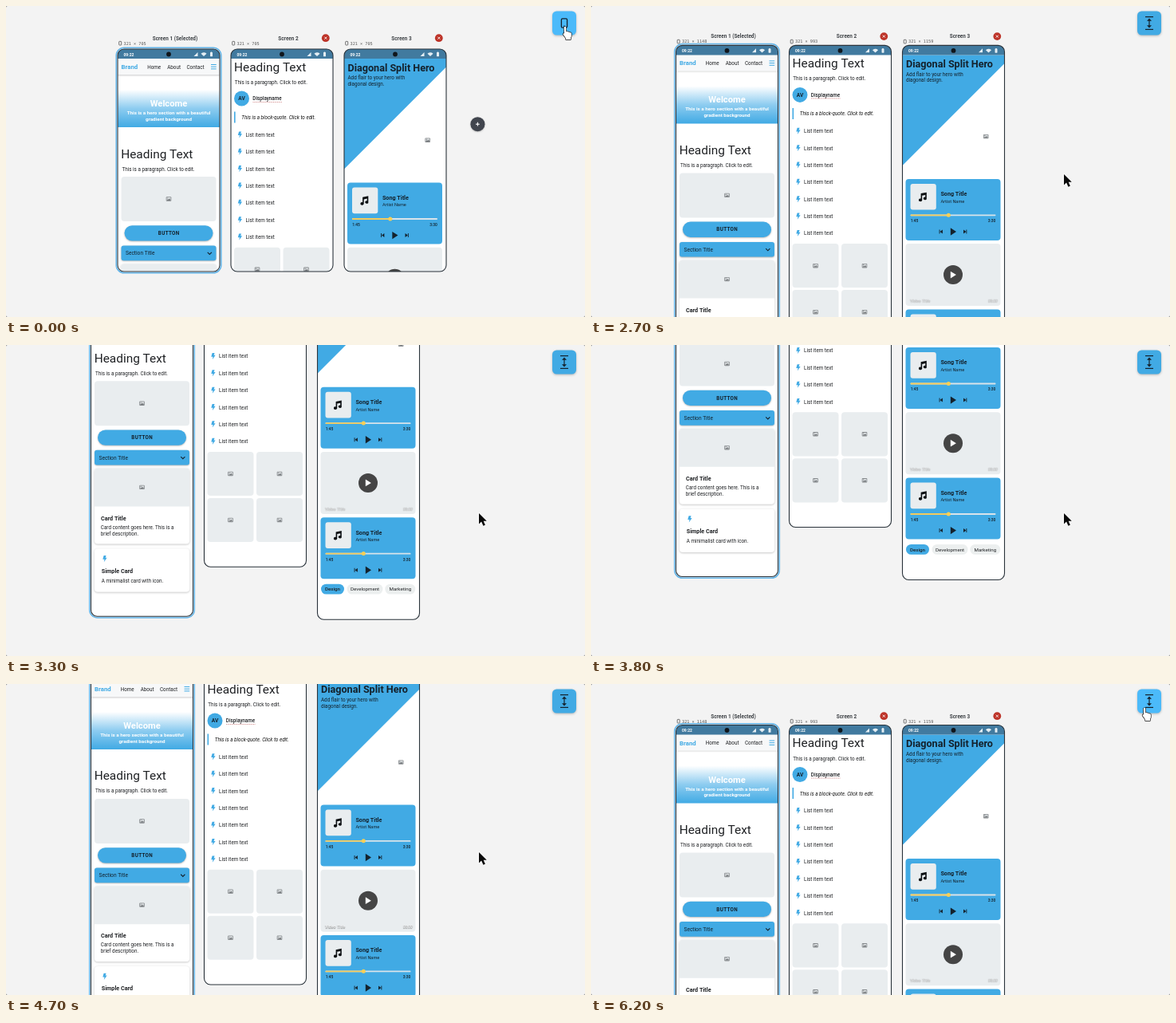
These frames come from a looping animation (726x390 px, 6300 ms). An HTML page with a canvas:

```html
<!DOCTYPE html>
<html lang="en">
<head>
<meta charset="utf-8">
<title>Screen height toggle</title>
<style>
  html, body { margin: 0; width: 100%; height: 100%; overflow: hidden; background: #f3f3f3; }
  canvas { display: block; width: 726px; height: 390px; }
</style>
</head>
<body>
<canvas id="stage"></canvas>
<script>
const W = 726, H = 390, LOOP = 6300, EXPAND_AT = 800;
const BLUE = '#41aae4', INK = '#14222d', TEXT = '#1f2124', GREY = '#e9edef';
const canvas = document.getElementById('stage');
const dpr = window.devicePixelRatio || 1;
canvas.width = W * dpr;
canvas.height = H * dpr;
const ctx = canvas.getContext('2d');

// Keyframes: [time, ...values]
const SCROLL = [[2640, 0], [3610, 216], [3900, 216], [5190, -.6], [5400, -.6], [5800, 0]];
const POINTER = [[0, 701, 26], [300, 702, 25], [1400, 701, 27], [1800, 674, 70], [2100, 596, 222],
  [2200, 593, 211], [5400, 593, 211], [6000, 678, 60], [6200, 694, 30], [6300, 697, 28]];

const HAND = new Path2D('M3.6 1.4c0-1.8 2.6-1.8 2.6 0v5c.6-.9 2.3-.7 2.4.4.7-.7 2.1-.3 2.2.7.8-.5 2-.1 2 1.1v3c0 1-.6 1.8-.9 2.6v1.8h-6v-1.6c-1-1.2-2-2.6-3.2-4.3-1-1.4.4-2.3 1.3-1.5z');
const ARROW = new Path2D('M0 0V13.4L3.1 10.6 5.4 15.8 7.9 14.7 5.7 9.7H9.8Z');
const BOLT = new Path2D('M-1.2-4H1.8L.8-1.2H2.8L-1 4.2-.3.7H-2.5Z');
const NOTE = new Path2D('M-2.6-4.6 4.6-6V2.6A2.2 1.8 0 1 1 3-.1V-2.7L-1-1.9V4A2.2 1.8 0 1 1-2.6 1.9Z');

function track(keys, t) {
  if (t <= keys[0][0]) return keys[0].slice(1);
  const next = keys.findIndex(k => k[0] > t);
  if (next < 0) return keys[keys.length - 1].slice(1);
  const a = keys[next - 1], b = keys[next];
  const p = (1 - Math.cos(Math.PI * (t - a[0]) / (b[0] - a[0]))) / 2;
  return a.slice(1).map((v, i) => v + (b[i + 1] - v) * p);
}

function box(x, y, w, h, r = 0) {
  ctx.beginPath();
  ctx.roundRect(x, y, w, h, r);
}

function rect(x, y, w, h, color, r = 0) {
  ctx.fillStyle = color;
  box(x, y, w, h, r);
  ctx.fill();
}

function circle(x, y, r, color) {
  ctx.fillStyle = color;
  ctx.beginPath();
  ctx.arc(x, y, r, 0, 7);
  ctx.fill();
}

function poly(color, ...points) {
  ctx.fillStyle = color;
  ctx.beginPath();
  for (let i = 0; i < points.length; i += 2) ctx.lineTo(points[i], points[i + 1]);
  ctx.closePath();
  ctx.fill();
}

function line(color, width, ...points) {
  ctx.strokeStyle = color;
  ctx.lineWidth = width;
  ctx.beginPath();
  for (let i = 0; i < points.length; i += 2) ctx.lineTo(points[i], points[i + 1]);
  ctx.stroke();
}

function glyph(path, x, y, fill, outline) {
  ctx.save();
  ctx.translate(x, y);
  if (outline) {
    ctx.strokeStyle = outline;
    ctx.lineWidth = 1.3;
    ctx.lineJoin = 'round';
    ctx.stroke(path);
  }
  ctx.fillStyle = fill;
  ctx.fill(path);
  ctx.restore();
}

function text(str, x, y, size = 6.3, color = TEXT, style = '400', align = 'left', family = 'Roboto, sans-serif') {
  ctx.font = `${style} ${size}px ${family}`;
  ctx.fillStyle = color;
  ctx.textAlign = align;
  ctx.fillText(str, x, y);
}

function withShadow(color, blur, dy, draw) {
  ctx.save();
  ctx.shadowColor = color;
  ctx.shadowBlur = blur * dpr;
  ctx.shadowOffsetY = dy * dpr;
  draw();
  ctx.restore();
}

function pictureIcon(x, y) {
  rect(x - 3.3, y - 2.7, 6.6, 5.4, '#85898c', 1);
  rect(x - 2.5, y - 1.9, 5, 3.8, '#dfe3e5');
  poly('#75797c', x - 2.5, y + 1.9, x - 1, y - .1, x - .1, y + .8, x + 1.1, y - .9, x + 2.5, y + 1.9);
  circle(x - 1.3, y - 1, .6, '#75797c');
}

function placeholder(x, y, w, h, r = 4) {
  rect(x, y, w, h, GREY, r);
  pictureIcon(x + w / 2, y + h / 2);
}

function card(y, h) {
  withShadow('rgba(0,0,0,.25)', 2.5, .8, () => rect(111, y, 119, h, '#fff', 4));
}

function statusBar(x) {
  rect(x, 50, 129, 13.5, '#417a9f');
  text('09:22', x + 7.5, 60, 5, '#fff', '700');
  circle(x + 64, 58, 2.9, '#10161c');
  poly('#e4eef4', x + 95.5, 60.4, x + 100.5, 60.4, x + 100.5, 55.4);
  ctx.fillStyle = '#e4eef4';
  ctx.beginPath();
  ctx.moveTo(x + 108, 60.6);
  ctx.arc(x + 108, 60.6, 4.8, -2.4, -.74);
  ctx.fill();
  rect(x + 116, 55.6, 3, 5.2, '#e4eef4', .6);
  rect(x + 116.8, 55, 1.4, 1, '#e4eef4');
}

function homeScreen() {
  withShadow('rgba(0,0,0,.25)', 2, .6, () => rect(106.5, 63.5, 128, 20.3, '#f7f8f9'));
  text('Brand', 111, 76.6, 7.8, BLUE, '700');
  ['Home', 'About', 'Contact'].forEach((s, i) => text(s, [143.7, 168.7, 193][i], 76.1));
  for (const y of [71, 73.7, 76.4]) line(BLUE, 1, 223.5, y, 230.2, y);

  const hero = ctx.createLinearGradient(0, 102.5, 0, 149.5);
  hero.addColorStop(0, '#fff');
  hero.addColorStop(.5, '#8dccf0');
  hero.addColorStop(1, BLUE);
  rect(106.5, 102.5, 128, 47, hero);
  text('Welcome', 170.5, 123.6, 11.2, '#fff', '700', 'center');
  text('This is a hero section with a beautiful', 170.5, 133.6, 6.25, '#fff', '600', 'center');
  text('gradient background', 170.5, 141.4, 6.25, '#fff', '600', 'center');

  text('Heading Text', 110.7, 188, 15.4);
  text('This is a paragraph. Click to edit.', 112, 204);
  placeholder(111, 211.5, 119, 56);

  withShadow('rgba(0,0,0,.3)', 2, .8, () => {
    rect(115, 272.7, 111, 19.3, BLUE, 10);
    rect(111, 298, 119, 18.7, BLUE, 3);
  });
  ctx.letterSpacing = '.35px';
  text('BUTTON', 170.7, 284.6, 6.3, INK, '700', 'center');
  ctx.letterSpacing = '0px';
  text('Section Title', 116.5, 309.9, 6.6, INK);
  line(INK, 1.1, 219.2, 306.3, 221.8, 308.9, 224.4, 306.3);

  card(320.7, 95);
  placeholder(111, 320.7, 119, 48, [4, 4, 0, 0]);
  text('Card Title', 119, 386, 7.2, TEXT, '700');
  text('Card content goes here. This is a', 118.8, 397);
  text('brief description.', 118.8, 405);

  card(421.5, 54.5);
  glyph(BOLT, 123.8, 434.3, BLUE);
  text('Simple Card', 119.8, 451.8, 7.2, TEXT, '700');
  text('A minimalist card with icon.', 119.8, 464.1);
}

function profileScreen() {
  text('Heading Text', 252.5, 79.3, 15.4);
  text('This is a paragraph. Click to edit.', 253.3, 95.5);
  circle(262, 113.5, 9.5, BLUE);
  text('AV', 262, 115.9, 6.6, INK, '700', 'center');
  text('Displayname', 275.8, 115.9, 6.3, TEXT, '500');
  ctx.setLineDash([1, .7]);
  line('#c46a6a', .7, 276, 118, 312.5, 118);
  ctx.setLineDash([]);
  rect(252.5, 130, 1.6, 14, BLUE);
  text('This is a block-quote. Click to edit.', 261.8, 139.5, 6.3, '#111', 'italic 400');
  for (let i = 0; i < 7; i++) {
    const y = 159.1 + i * 21.35;
    glyph(BOLT, 259.8, y - .2, BLUE);
    text('List item text', 267, y + 2.3);
  }
  for (const y of [300.2, 358.2])
    for (const x of [252.5, 314]) placeholder(x, y, 58, 55.2);
}

function player(dy) {
  ctx.save();
  ctx.translate(0, dy);
  rect(394.5, 219, 119, 77, BLUE, 4);
  rect(400.5, 225, 32.3, 32.7, GREY, 3);
  glyph(NOTE, 416.2, 241.8, '#0c0f12');
  text('Song Title', 438.4, 240.3, 7.2, INK, '700');
  text('Artist Name', 438.4, 248.8, 5.6, INK);
  rect(400.5, 263.5, 107, 1.9, '#d9e4ea', 1);
  rect(400.5, 263.5, 48, 1.9, '#f3cb5e', 1);
  circle(448.3, 264.4, 2.5, '#f7cf55');
  text('1:45', 400.7, 273.3, 4.9, INK, '500');
  text('3:30', 507.4, 273.3, 4.9, INK, '500', 'right');
  rect(436.6, 282.6, .9, 5, INK);
  poly(INK, 440.9, 282.6, 440.9, 287.6, 437.5, 285.1);
  poly(INK, 450.8, 280.4, 450.8, 289.8, 458, 285.1);
  poly(INK, 467, 282.6, 467, 287.6, 470.4, 285.1);
  rect(470.4, 282.6, .9, 5, INK);
  ctx.restore();
}

function mediaScreen() {
  poly(BLUE, 390, 63.5, 519, 63.5, 519, 73.5, 390, 202.5);
  text('Diagonal Split Hero', 395, 79, 12.6, INK, '700');
  text('Add flair to your hero with', 395, 89.8, 6.3, INK);
  text('diagonal design.', 395, 97.6, 6.3, INK);
  pictureIcon(495.2, 165.7);
  player(0);

  rect(394.5, 300.2, 119, 78, GREY, 4);
  circle(454, 339.2, 12, '#454545');
  poly('#fff', 450.8, 334.8, 450.8, 343.6, 457.9, 339.2);
  withShadow('rgba(0,0,0,.6)', 1, .4, () => {
    text('Video Title', 400, 373.8, 5.5, '#f4f4f4', 'italic 400');
    text('00:00', 509.5, 373.8, 4.8, '#f4f4f4', 'italic 400', 'right');
  });

  player(163.5);
  [['Design', 395, 29], ['Development', 427.5, 45], ['Marketing', 475.3, 38]].forEach(([label, x, w], i) => {
    rect(x, 466, w, 12.8, i ? '#ecefef' : BLUE, 6.4);
    text(label, x + w / 2, 474.6, 6.2, TEXT, i ? '400' : '500', 'center');
  });
}

const PHONES = [
  { label: 'Screen 1 (Selected)', rows: 1148, height: 455, draw: homeScreen },
  { label: 'Screen 2', rows: 993, height: 393, draw: profileScreen },
  { label: 'Screen 3', rows: 1159, height: 459, draw: mediaScreen },
];

function phone({ label, rows, height, draw }, index, expanded) {
  const x = 106.5 + 142 * index, y = 51.5, h = expanded ? height : 279;

  text(label, x + 72, 42.6, 6.4, '#3f4347', '700', 'center');
  ctx.strokeStyle = '#555';
  ctx.lineWidth = .8;
  box(x + 1.7, 44.4, 3, 4.6, .6);
  ctx.stroke();
  text(`321 × ${expanded ? rows : 705}`, x + 7.6, 48.6, 5.2, '#555', '400', 'left', '"DejaVu Sans Mono", monospace');
  if (index) {
    const cx = x + 118.8;
    circle(cx, 40.2, 4.9, '#bd3328');
    line('#fff', .9, cx - 1.5, 38.7, cx + 1.5, 41.7);
    line('#fff', .9, cx + 1.5, 38.7, cx - 1.5, 41.7);
  }

  ctx.save();
  if (!expanded) ctx.translate(0, 2.5);
  if (!index) {
    ctx.strokeStyle = '#62b4e8';
    ctx.lineWidth = 1.5;
    box(x - 1.8, y - 1.8, 131.6, h + 3.6, 10);
    ctx.stroke();
  }
  ctx.save();
  box(x, y, 128, h, 8);
  ctx.clip();
  rect(x, y, 128, h, '#fff');
  draw();
  statusBar(x);
  ctx.restore();
  ctx.strokeStyle = '#2a333b';
  ctx.lineWidth = 1.1;
  box(x, y, 128, h, 8);
  ctx.stroke();
  ctx.restore();
}

function toggleButton(expanded, hover) {
  withShadow('rgba(0,0,0,.25)', 3, 1, () => rect(685, 6.5, 30, 30, hover ? '#4bbafa' : BLUE, 5.5));
  if (expanded) {
    line(INK, 1.2, 695, 13.6, 705, 13.6);
    line(INK, 1.2, 695, 29.4, 705, 29.4);
    line(INK, 1.2, 700, 17, 700, 26);
    poly(INK, 697, 18.8, 703, 18.8, 700, 15.4);
    poly(INK, 697, 24.2, 703, 24.2, 700, 27.6);
  } else {
    ctx.strokeStyle = INK;
    ctx.lineWidth = 1.3;
    box(696.4, 15.8, 7.2, 11.4, 1.4);
    ctx.stroke();
    line(INK, .9, 698.8, 25.2, 701.2, 25.2);
  }
}

function render(t) {
  const expanded = t >= EXPAND_AT;
  const [scroll] = track(SCROLL, t);
  const [px, py] = track(POINTER, t);
  const hover = px > 685 && py < 36.5;

  ctx.setTransform(dpr, 0, 0, dpr, 0, 0);
  rect(0, 0, W, H, '#777');
  rect(0, 0, W, H, '#f3f3f3', 2);

  ctx.save();
  ctx.translate(expanded ? 0 : 33.5, -scroll);
  PHONES.forEach((p, i) => phone(p, i, expanded));
  ctx.restore();

  if (!expanded) {
    withShadow('rgba(0,0,0,.3)', 2, .6, () => circle(591.4, 148.2, 9, '#41454e'));
    line('#fff', 1.1, 589, 148.2, 593.8, 148.2);
    line('#fff', 1.1, 591.4, 145.8, 591.4, 150.6);
  }

  toggleButton(expanded, hover);
  if (hover) glyph(HAND, px - 4.9, py, '#fff', '#111');
  else glyph(ARROW, px, py, '#0a0a0a', '#fff');
}

const start = performance.now();
function tick() {
  render((performance.now() - start) % LOOP);
  requestAnimationFrame(tick);
}
tick();
</script>
</body>
</html>
```
